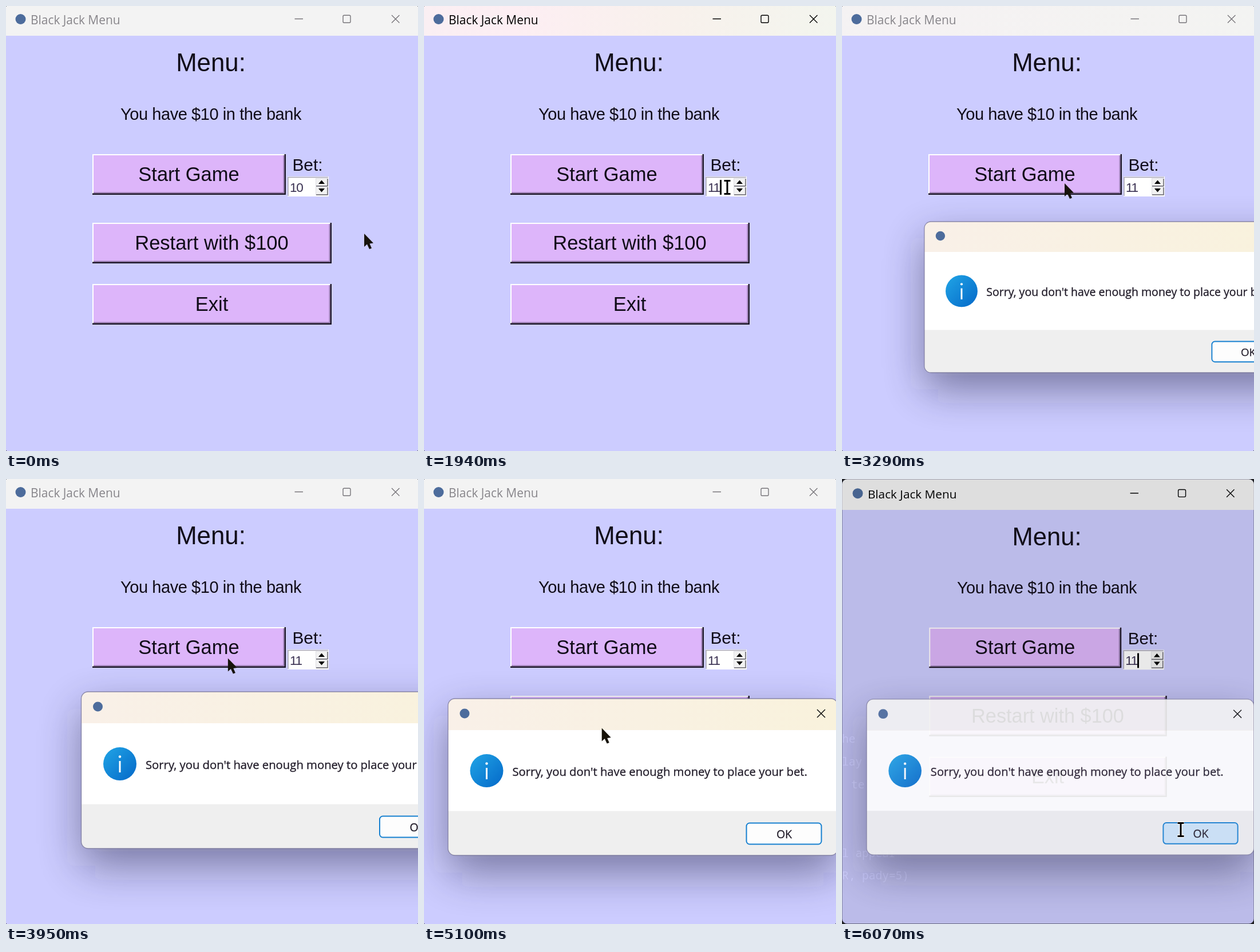
An HTML page for the animation above (6.11 s loop, 720 px wide and 778 px high).

```html
<!DOCTYPE html>
<html lang="en">
<head>
<meta charset="utf-8">
<title>Black Jack Menu</title>
<style>
  html, body { margin: 0; width: 100%; height: 100%; overflow: hidden; background: #1e1f22; }
  svg { display: block; width: 100vw; height: 100vh; }
  text { white-space: pre; }
  .tk { font-family: "Liberation Sans", Arial, sans-serif; fill: #100c18; }
  .ui { font-family: "Open Sans", "Noto Sans", sans-serif; }
  .mid { text-anchor: middle; }
  .code { font: 19.5px "Noto Sans Mono", monospace; fill: #b8bac2; }
</style>
</head>
<body>
<svg viewBox="0 0 720 778">
  <defs>
    <linearGradient id="activeBar">
      <stop offset="0" stop-color="#faeff3"/>
      <stop offset=".22" stop-color="#fdeef3"/>
      <stop offset=".6" stop-color="#f8f1ec"/>
      <stop offset="1" stop-color="#f3f5ee"/>
    </linearGradient>
    <linearGradient id="dialogBar">
      <stop offset="0" stop-color="#f9f0e8"/>
      <stop offset="1" stop-color="#f9f2dc"/>
    </linearGradient>
    <linearGradient id="infoBlue" x2="1" y2="1">
      <stop offset="0" stop-color="#21a5e6"/>
      <stop offset="1" stop-color="#0468c8"/>
    </linearGradient>
    <filter id="soft" x="-30%" y="-60%" width="160%" height="220%">
      <feGaussianBlur stdDeviation="37"/>
    </filter>
    <clipPath id="windowShape"><rect x="-2" y="-2" width="724" height="782" rx="9"/></clipPath>
    <clipPath id="dialogShape"><rect width="681" height="274" rx="12"/></clipPath>
  </defs>

  <rect width="720" height="778" fill="#1e1f22"/>
  <g id="code" class="code">
    <text x="0" y="461">he</text>
    <text x="0" y="501">lay</text>
    <text x="16" y="541">te</text>
    <text x="0" y="661">l appear</text>
    <text x="0" y="700">R, pady=5)</text>
  </g>

  <g id="menu">
    <g clip-path="url(#windowShape)">
      <rect x="-2" y="-2" width="724" height="782" fill="#ccccff"/>
      <rect x="-2" y="-2" width="724" height="54" fill="#f3f3f3"/>
      <rect id="glow" x="-2" y="-2" width="724" height="54" fill="url(#activeBar)"/>
    </g>
    <circle cx="25.5" cy="23" r="9" fill="#4d6c9c"/>
    <text id="caption" class="ui" x="43" y="32" font-size="20.9">Black Jack Menu</text>
    <g id="controls" fill="none" stroke-width="1.4">
      <path d="M504.500 22.500H519M674 16L687.500 29.500M687.500 16L674 29.500"/>
      <rect x="589" y="16.200" width="13" height="13" rx="2"/>
    </g>
    <g class="tk">
      <text class="mid" x="358" y="114" font-size="43.800">Menu:</text>
      <text class="mid" x="358" y="199" font-size="29" letter-spacing="-.42">You have $10 in the bank</text>
      <text class="mid" x="527" y="288" font-size="29.800">Bet:</text>
    </g>
    <g id="buttons"></g>
    <g id="spinbox">
      <rect x="492" y="298" width="72" height="35" fill="#fff"/>
      <path d="M493 332V299.500H563" fill="none" stroke="#a5a2b4" stroke-width="1.500"/>
      <g fill="#f2f2f2" stroke="#dedee4">
        <rect x="541.500" y="301.500" width="20" height="13.500"/>
        <rect x="541.500" y="316" width="20" height="14"/>
      </g>
      <path d="M542 314.700H562V302M542 330H562V317" fill="none" stroke="#66646c" stroke-width="1.500"/>
      <path d="M546 311L551.500 304.500L557 311ZM546 319L551.500 325.500L557 319Z" fill="#000"/>
      <text id="bet" x="496" y="325" class="tk" font-size="22.500" letter-spacing="-1.300" style="fill:#3a3152"></text>
      <rect id="caret" y="304" width="3" height="26"/>
    </g>
  </g>

  <g id="dialog">
    <rect y="30" width="681" height="274" rx="12" fill="#181430" opacity=".45" filter="url(#soft)"/>
    <g clip-path="url(#dialogShape)">
      <rect width="681" height="274" fill="#fff"/>
      <rect width="681" height="55" fill="url(#dialogBar)"/>
      <rect id="dull" width="681" height="55" fill="#f3f3f3"/>
      <rect y="196.500" width="681" height="78" fill="#efefef"/>
    </g>
    <rect width="681" height="274" rx="12" fill="none" stroke="#6f6c92" stroke-opacity=".75" stroke-width="1.300"/>
    <circle cx="29" cy="26" r="8.500" fill="#4d6c9c"/>
    <path d="M645 19L659 33M659 19L645 33" stroke="#111" stroke-width="1.500"/>
    <circle cx="67.500" cy="126" r="29" fill="url(#infoBlue)"/>
    <path d="M67.500 121V141" stroke="#fff" stroke-width="3"/>
    <circle cx="67.500" cy="113.500" r="2.200" fill="#fff"/>
    <g class="ui" fill="#241f2c">
      <g stroke="#241f2c" stroke-width=".35">
        <text x="112.500" y="134.500" font-size="20.250">Sorry, you don't have enough money to place your bet.</text>
      </g>
      <rect id="ok" x="521.500" y="217.500" width="131" height="37" rx="5.500" stroke="#1680d0" stroke-width="2"/>
      <text class="mid" x="587.500" y="244" font-size="19.500" stroke="#241f2c" stroke-width=".3">OK</text>
    </g>
  </g>

  <circle id="halo" r="22" fill="#fff51e" opacity=".6"/>
  <path id="arrow" d="M0 0V23L5 18.500L9 27L13 25.500L9.500 17.500L16 16.500Z" fill="#17130a"/>
  <g id="beam" fill="none">
    <path d="M-6 -11.500H6M-6 11.500H6M0 -11V11" stroke="#fff" stroke-width="5.500"/>
    <path d="M-5.500 -11.500H5.500M-5.500 11.500H5.500M0 -11V11" stroke="#000" stroke-width="3"/>
  </g>
</svg>

<script>
const LOOP = 6110;
const $ = id => document.getElementById(id);
const set = (id, attrs) => {
  for (const name in attrs) $(id).setAttribute(name, attrs[name]);
};
const show = (id, on) => set(id, { display: on ? 'inline' : 'none' });
const mix = (a, b, p) => a + (b - a) * p;
const ease = p => p * p * (3 - 2 * p);
const within = (t, from, to) => t >= from && t < to;

// Progress of a move drawn in n equal steps, the first of them at `from`.
const stepped = (t, from, to, n) =>
  t < from ? 0 : Math.min(n, Math.floor((t - from) / (to - from) * (n - 1) + 1.02)) / n;

// Last value whose start time has passed.
const held = (t, keys) => keys.reduce((value, [at, next]) => t >= at ? next : value, keys[0][1]);

const line = (a, b, p) => [mix(a[0], b[0], p), mix(a[1], b[1], p)];
const curve = (a, b, c, p) => line(line(a, b, p), line(b, c, p), p);

function addButton(id, label, y, width) {
  const x = 151, h = 71, r = x + width, b = y + h;
  $('buttons').insertAdjacentHTML('beforeend', `<g id="${id}">
    <rect x="${x}" y="${y}" width="${width}" height="${h}" fill="#ddb5fa"/>
    <path d="M${x + 2} ${b - 3.5}H${r - 3.5}V${y + 2}" fill="none" stroke="#9b80b4" stroke-width="2"/>
    <path class="light" d="M${x + 1} ${b - 1}V${y + 1}H${r - 1}" fill="none" stroke="#fff" stroke-width="2"/>
    <path class="dark" d="M${x} ${b - 1.2}H${r - 1.2}V${y}" fill="none" stroke="#1c1726" stroke-width="2.4"/>
    <text class="tk mid" x="${x + width / 2 - .5}" y="${y + 47}" font-size="34.5">${label}</text></g>`);
}
addButton('start', 'Start Game', 259, 338);
addButton('restart', 'Restart with $100', 379, 418);
addButton('exit', 'Exit', 486, 418);

const REST = [626, 398], ENTRY = [530, 317], START = [389, 310], GRAB = [363, 389],
      DROP = [284, 399], BEND = [400, 570], OK = [592, 613];

function pointer(t) {
  if (t < 2290) return line(REST, ENTRY, ease(stepped(t, 70, 670, 10)));
  if (t < 3950) return line(ENTRY, START, ease(stepped(t, 2290, 2700, 6)));
  if (t < 4490) return line(START, GRAB, ease(stepped(t, 3950, 4420, 8)));
  if (t < 5100) return held(t, [[4490, [358, 395]], [4560, [340, 397]], [4630, [315, 398]],
                                [4700, [296, 399]], [4770, DROP]]);
  return curve(DROP, BEND, OK, stepped(t, 5100, 5640, 9));
}

const dialogAt = t => held(t, [[0, [131.5, 372]], [4490, [127, 378]], [4560, [105, 381]],
                               [4630, [75, 383]], [4700, [52, 384]], [4770, [42, 384]], [6070, [41, 384]]]);

function drawMenu(t) {
  const leaving = t >= 6070;
  const active = within(t, 810, 3160) || t >= 5990;
  set('menu', {
    opacity: leaving ? .9 : 1,
    transform: leaving ? 'translate(360 389) scale(.994) translate(-360 -389)' : ''
  });
  show('code', leaving);
  const glow = t < 3160 ? stepped(t, 740, 1020, 5)
    : held(t, [[3160, .6], [3240, .4], [3290, .2], [3360, 0]]);
  set('glow', { opacity: glow });
  set('caption', { fill: active ? '#000' : '#87858a' });
  set('controls', { stroke: active ? '#000' : '#77757a' });

  const pressed = within(t, 3030, 3100);
  const [light, dark] = ['.light', '.dark'].map(c => $('start').querySelector(c));
  light.setAttribute('stroke', pressed ? '#1c1726' : '#fff');
  dark.setAttribute('stroke', pressed ? '#fff' : '#1c1726');

  $('bet').textContent = held(t, [[0, '10'], [1480, '1'], [1940, '11']]);
  show('caret', within(t, 740, 1350) || within(t, 1480, 1680) || within(t, 1940, 2540) || t >= 5990);
  set('caret', { x: within(t, 1480, 1940) ? 506.5 : 517 });
}

function drawDialog(t, [px, py]) {
  show('dialog', t >= 3240);
  const [x, y] = dialogAt(t);
  const scale = held(t, [[0, .93], [3290, .9635], [3360, .988], [3430, .997], [3490, 1], [6070, .994]]);
  set('dialog', {
    transform: `translate(${x + 340.5} ${y + 137}) scale(${scale}) translate(-340.5 -137)`,
    opacity: held(t, [[0, .55], [3290, 1], [6070, .9]])
  });
  set('dull', { opacity: held(t, [[0, 0], [5990, .5], [6070, 1]]) });
  const hover = t > 5100 && px > 563 && py > 601;
  set('ok', { fill: t >= 5840 ? '#cce4f7' : hover ? '#e0eef9' : '#fdfdfd' });
}

function drawPointer(t, [x, y]) {
  const inEntry = x > 494 && x < 541 && y > 300 && y < 332;
  const beam = inEntry || t >= 6070;
  show('beam', beam);
  show('arrow', !beam);
  show('halo', within(t, 740, 880) || within(t, 3030, 3160) || within(t, 4420, 5100) || within(t, 5840, 5990));
  const transform = `translate(${x} ${y})`;
  for (const id of ['beam', 'arrow', 'halo']) set(id, { transform });
}

function render(now) {
  const t = now % LOOP;
  const at = pointer(t);
  drawMenu(t);
  drawDialog(t, at);
  drawPointer(t, at);
}

const begin = performance.now();
function tick() {
  render(performance.now() - begin);
  requestAnimationFrame(tick);
}
tick();
</script>
</body>
</html>
```
